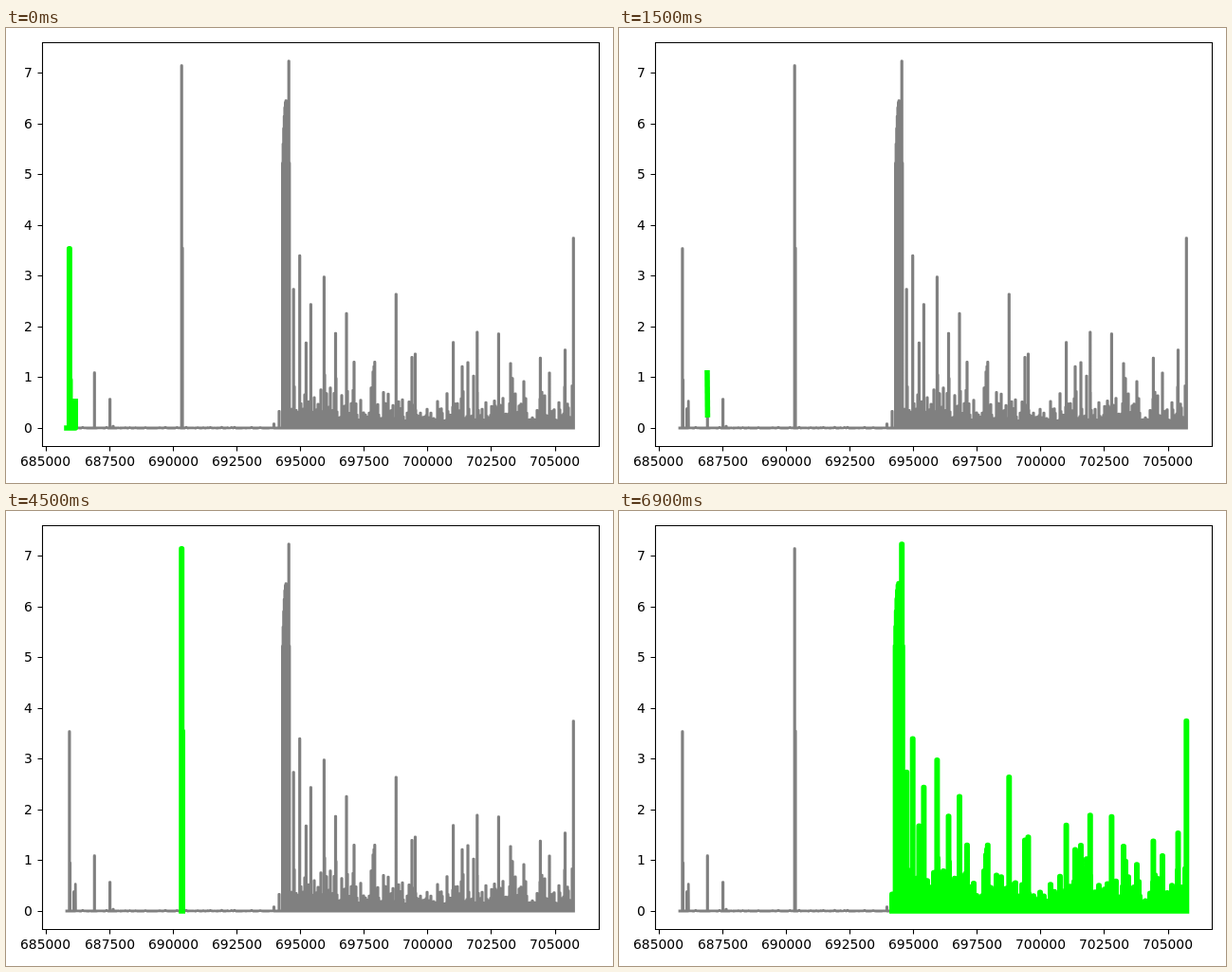
These frames come from a looping animation (640 px wide and 480 px high, 7.5 s). An HTML page:

```html
<!DOCTYPE html>
<html lang="en">
<head>
<meta charset="utf-8">
<title>Signal segments</title>
<style>
  html, body { margin: 0; width: 100%; height: 100%; overflow: hidden; background: #fff; }
  svg { display: block; width: 640px; height: 480px; }
  text { font: 13.89px "DejaVu Sans", sans-serif; }
  polyline { fill: none; stroke-linejoin: round; stroke-linecap: square; }
  .signal { stroke: #808080; stroke-width: 2.78; }
  .mark { stroke: #0f0; stroke-width: 5.56; }
  .axes { fill: none; stroke: #000; stroke-width: 1.1; }
</style>
</head>
<body>
<svg id="chart" viewBox="0 0 640 480"></svg>
<script>
const chart = document.getElementById('chart');
const STEP = 1500, BASE = 422, UNIT = 53.46;

function add(tag, attrs, text = '') {
  const el = document.createElementNS('http://www.w3.org/2000/svg', tag);
  for (const key in attrs) el.setAttribute(key, attrs[key]);
  el.textContent = text;
  chart.append(el);
  return el;
}

let seed = 11;
const random = () => (seed = seed * 16807 % 2147483647) / 2147483647;

// Points are [pixel x, value]; a spike leaves the zero line and returns to it.
const spike = ([x, v]) => [[x - .2, 0], [x - .2, v], [x + .2, v], [x + .2, 0]];
const line = (points, cls) => add('polyline', {
  class: cls,
  points: points.map(([x, v]) => `${x.toFixed(2)},${(BASE - v * UNIT).toFixed(2)}`).join(' ')
});

function quiet(from, to) {
  const points = [];
  for (let x = from; x < to; x += 1.5) points.push([x, random() ** 6 * 0.016]);
  return points;
}

// Tall peaks stand out of a dome and a swelling, decaying noise floor.
const burst = [
  [288, .33], [298.2, 7.24], [303.2, 2.74], [309.7, 3.4], [316.4, 1.68],
  [321.4, 2.44], [335.4, 2.98], [347.5, 1.87], [359, 2.26], [388.8, 1.3],
  [411.3, 2.64], [431.5, 1.46], [471.6, 1.69], [496.8, 1.89], [519.4, 1.86],
  [563.4, 1.38], [589.5, 1.54], [598.3, 3.75]
];
for (let x = 291.6; x < 299.4; x += .6) burst.push([x, 6.46 - .095 * (x - 295.2) ** 2]);
for (let x = 300; x < 598; x++) {
  const r = random();
  const swell = 1 - .25 * Math.cos((x - 402) * Math.PI / 25);
  const decay = 1 + 1.6 * Math.exp((300 - x) / 12);
  burst.push([x, (.12 + .4 * r ** 2 + .7 * r ** 14) * swell * decay]);
}
burst.sort((a, b) => a[0] - b[0]);

const segments = [
  [[64, 0], ...spike([66.9, 3.54]), ...spike([67.5, .95]),
   ...spike([71.6, .38]), [73.2, 0], [73.2, .53]],
  [[93.4, .26], [93, 1.09]],
  [[109.6, .2], [109.6, .57]],
  [...spike([185.2, 7.15]), ...spike([186, 3.55])],
  burst.flatMap(spike)
];

line([
  ...segments[0], ...quiet(73.4, 93),
  ...spike([93.3, 1.09]), ...quiet(94, 109),
  ...spike([109.6, .57]), ...spike([113, .035]), ...quiet(114, 185),
  ...segments[3], ...quiet(187, 282),
  ...spike([282.5, .08]), ...segments[4]
], 'signal');
const marks = segments.map(points => line(points, 'mark'));

// Axes, with labels on whole pixels
let ticks = 'M38.5 15.5H625.5V441.5H38.5Z';
for (let i = 0; i < 9; i++) {
  const x = 42 + i * 67.13;
  ticks += `M${Math.floor(x) + .5} 441.5v5`;
  add('text', { x: Math.round(x - 26.6), y: 462 }, 685000 + i * 2500);
}
for (let v = 0; v < 8; v++) {
  const y = Math.floor(BASE - v * UNIT);
  ticks += `M38.5 ${y + .5}h-5`;
  add('text', { x: 19, y: y + 5 }, v);
}
add('path', { class: 'axes', d: ticks });

const start = performance.now();
function draw() {
  const active = Math.floor((performance.now() - start) / STEP) % marks.length;
  marks.forEach((mark, i) => mark.style.display = i === active ? '' : 'none');
  requestAnimationFrame(draw);
}
draw();
</script>
</body>
</html>
```
